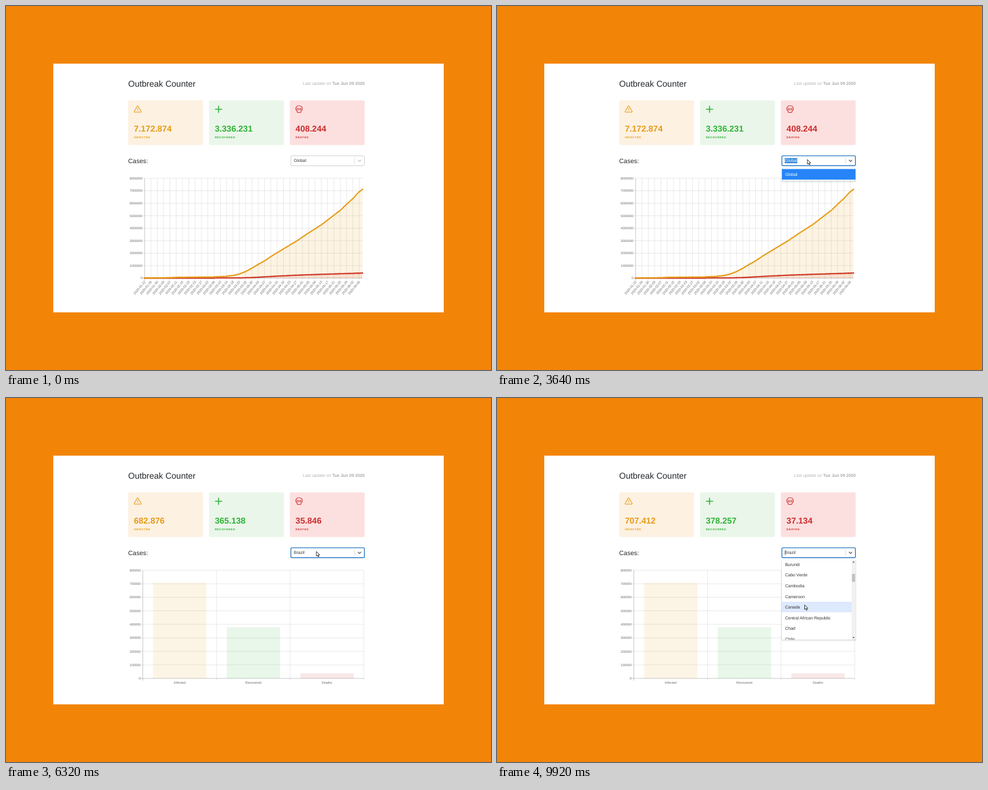
Write an HTML page that moves like this. It is 800x600 px and loops after 10 s.

```html
<!DOCTYPE html>
<html lang="en">
<head>
<meta charset="utf-8">
<title>Outbreak Counter</title>
<style>
  html, body { margin: 0; width: 100%; height: 100%; overflow: hidden; background: #f28507; }
  svg { display: block; }
  text { font-family: "Liberation Sans", Arial, sans-serif; text-rendering: geometricPrecision; }
  .bold { font-weight: bold; }
</style>
</head>
<body>
<svg id="stage" width="800" height="600" viewBox="0 0 800 600"></svg>
<script>
const LOOP = 10000;
const ORANGE = '#e59b16', GREEN = '#2eb135', RED = '#cb2d2d';
const GLOBAL = [7172874, 3336231, 408244], BRAZIL = [707412, 378257, 37134];
const COUNT_START = 4998, CHART_START = 5030;
const ROW = 17.55, LIST_TOP = 268.7, COUNTRY_TOTAL = 188;
const COUNTRIES = ('Global,Afghanistan,Albania,Algeria,Andorra,Angola,Antigua and Barbuda,Argentina,Armenia,' +
  'Australia,Austria,Azerbaijan,Bahamas,Bahrain,Bangladesh,Barbados,Belarus,Belgium,Belize,Benin,Bhutan,' +
  'Bolivia,Bosnia and Herzegovina,Botswana,Brazil,Brunei,Bulgaria,Burkina Faso,Burma,Burundi,Cabo Verde,' +
  'Cambodia,Cameroon,Canada,Central African Republic,Chad,Chile,China,Colombia').split(',');

const smooth = p => p * p * (3 - 2 * p);
const linear = p => p;

// Keys are [position, value, value...]; returns the values at a position.
function track(keys, at, ease = linear) {
  let i = 1;
  while (i < keys.length - 1 && keys[i][0] < at) i++;
  const [a, b] = [keys[i - 1], keys[i]];
  const p = ease(Math.min(1, Math.max(0, (at - a[0]) / (b[0] - a[0]))));
  return a.slice(1).map((v, k) => v + (b[k + 1] - v) * p);
}

const text = (x, y, size, fill, str, extra = '') =>
  `<text x="${x}" y="${y}" font-size="${size}" fill="${fill}" ${extra}>${str}</text>`;
const rect = (x, y, w, h, fill, extra = '') =>
  `<rect x="${x}" y="${y}" width="${w}" height="${h}" fill="${fill}" ${extra}/>`;
const path = (d, stroke, width, extra = '') =>
  `<path d="${d}" fill="none" stroke="${stroke}" stroke-width="${width}" ${extra}/>`;
const range = n => [...Array(n).keys()];
const thousands = n => String(Math.round(n)).replace(/\B(?=(\d{3})+$)/g, '.');

const ROUND = 'stroke-linejoin="round" stroke-linecap="round"';
const CARDS = [
  { x: 201.5, bg: '#fdf1e1', color: ORANGE, label: 'INFECTED',
    icon: path('M216.2 165.4L211.6 173.6Q211 175 212.4 175H222Q223.4 175 222.8 173.6L218.2 165.4Q217.2 164 216.2 165.4ZM217.2 168.4V171M217.2 172.7V173', ORANGE, 1.1, ROUND) },
  { x: 335, bg: '#eaf6ea', color: GREEN, label: 'RECOVERED',
    icon: path('M350.6 165V175.4M345.4 170.2H355.8', GREEN, 1.6, ROUND) },
  { x: 468.2, bg: '#fce0df', color: RED, label: 'DEATHS',
    icon: path('M480.2 173.2Q478 172 478 169.4A5.4 5.2 0 0 1 488.8 169.4Q488.8 172 486.6 173.2V174.2Q486.6 175.5 485.2 175.5H481.6Q480.2 175.5 480.2 174.2Z', RED, 1.1) +
      [481.3, 485.5].map(x => `<circle cx="${x}" cy="169.9" r="1.4" fill="none" stroke="${RED}"/>`).join('') +
      path('M483.4 172.3V173', RED, .8) }
];

function header() {
  return rect(78, 95, 644, 410, '#fff') +
    text(201.5, 132.6, 14, '#25282c', 'Outbreak Counter') +
    text(591.6, 130, 7, '#b4b4b4', 'Last update on <tspan class="bold" fill="#a9a9a9">Tue Jun 09 2020</tspan>', 'text-anchor="end"') +
    CARDS.map(c => rect(c.x, 155.6, 123.4, 73.6, c.bg, 'rx="2.5"') + c.icon +
      text(c.x + 9.4, 206.8, 14, c.color, '', 'class="bold count"') +
      text(c.x + 9.4, 217.7, 4.5, c.color, c.label, 'class="bold" letter-spacing=".6"')).join('') +
    text(201.5, 258.6, 10.5, '#25282c', 'Cases:');
}

// Horizontal grid with value labels, from the top down to zero.
function yAxis(left, right, bottom, unit) {
  const step = (bottom - 284) / 8;
  return range(9).map(i => {
    const y = bottom - i * step;
    return path(`M${left - 3.5} ${y}H${right}`, '#000', .7, `opacity="${i ? .13 : .32}"`) +
      text(left - 3.8, y + 1.9, 5.4, '#666', i * unit, 'text-anchor="end"');
  }).join('');
}

function series(keys, color, fillOpacity) {
  const points = range(139).map(day => {
    const x = 228.7 + day * 2.602;
    return [x.toFixed(1), track(keys, x)[0].toFixed(1)];
  });
  const line = 'M' + points.map(p => p.join(' ')).join('L');
  return `<path d="${line}V448.5H228.7Z" fill="${color}" opacity="${fillOpacity}"/>` +
    path(line, color, 1.5) +
    points.map(([x, y]) => `<circle cx="${x}" cy="${y}" r="1.3" fill="${color}"/>`).join('');
}

function lineChart() {
  const dates = range(35).map(i => {
    const x = 228.7 + i * 10.408;
    const date = new Date(Date.UTC(2020, 0, 22 + i * 4)).toISOString().slice(0, 10);
    return path(`M${x} 284V452.5`, '#000', .7, `opacity="${i ? .13 : .32}"`) +
      text(0, 1.9, 5.4, '#666', date, `text-anchor="end" transform="translate(${x + .4} 453.8) rotate(-50)"`);
  }).join('');
  const deaths = [[228, 448.5], [385, 448.3], [410, 447.4], [440, 445.7], [480, 443.7], [530, 442], [588, 440.2]];
  const infected = [[228, 448.5], [255, 448.2], [285, 447.3], [340, 446.7], [360, 445.8], [375, 444.2], [385, 441.8],
    [395, 437.8], [405, 432.6], [415, 426.5], [425, 421], [440, 411], [460, 399], [480, 387], [500, 373.5],
    [522, 359.5], [540, 345.5], [552, 336.5], [562, 326.5], [573, 316.6], [581, 307.6], [588, 302]];
  return yAxis(228.7, 588, 448.5, 1000000) + dates + series(deaths, RED, .1) + series(infected, ORANGE, .12);
}

function barChart() {
  const columns = range(4).map(i =>
    path(`M${225.7 + i * 121.5} 284V466`, '#000', .7, `opacity="${i ? .13 : .32}"`)).join('');
  return yAxis(225.7, 590.2, 462.2, 100000) + columns +
    ['Infected', 'Recovered', 'Deaths'].map((name, i) =>
      rect(242.6 + i * 121.5, 462, 88, 0, CARDS[i].color, 'class="bar" opacity=".11"') +
      text(286.4 + i * 121.5, 471.4, 5.4, '#666', name, 'text-anchor="middle"')).join('');
}

function menu(options, selected, hot, scroll) {
  const long = options.length > 7;
  const height = long ? 131.5 : options.length * ROW + 4;
  const width = long ? 115 : 121.6;
  const rows = options.map((name, i) => {
    const y = 2 + i * ROW - scroll;
    if (y < -ROW || y > height) return '';
    const fill = name === selected ? '#2684f8' : i === hot ? '#dde9fd' : '#fff';
    return rect(0, y, width, ROW, fill) +
      text(5.2, y + 11.3, 7, name === selected ? '#fff' : '#333', name);
  }).join('');
  const thumb = 6.6 + scroll / (COUNTRY_TOTAL * ROW - 131) * 103;
  const bar = long ? rect(115, 0, 6.6, height, '#f1f1f1') + rect(115.6, thumb, 5, 13, '#c1c1c1') +
    '<path d="M116.4 4.6h3.6l-1.8-2zM116.4 127.2h3.6l-1.8 2z" fill="#444"/>' : '';
  return rect(469.5, 266.5, 122.6, height + 1.5, '#000', 'rx="2" opacity=".09"') +
    rect(468.8, 267.5, 124, height + 2, '#000', 'rx="3" opacity=".05"') +
    `<svg x="470" y="266.7" width="121.6" height="${height}">${rect(0, 0, 121.6, height, '#fff', 'rx="2"')}${rows}${bar}</svg>`;
}

function select(t, cursorY) {
  const focused = t >= 2600;
  const typing = t >= 3720 && t < 4400;
  const marked = t >= 3400 && t < 3720;
  const listOpen = t >= 6960;
  let value = t < 3720 ? 'Global' : 'Brazil';
  if (typing) value = value.slice(0, 1 + Math.floor((t - 3720) / 90));

  const border = focused ? '#2f7dc4' : t > 900 ? '#b0b0b0' : '#cfcfcf';
  let out = rect(469.9, 246.9, 121.4, 16.4, '#fff', `rx="2" stroke="${border}" stroke-width="${focused ? 1.4 : 1}"`) +
    (marked ? rect(474.6, 250.6, 20.8, 8.6, '#3389dd') : '') +
    text(474.8, 257.4, 7, marked ? '#fff' : '#333', value) +
    path('M575 250.3V260', '#ccc', .7) +
    path('M580.8 254L583.1 256.3L585.4 254', focused ? '#555' : '#c4c4c4', 1.1, ROUND);
  if (listOpen) {
    out += path('M475.2 250.6V259.2', '#333', .6);
    const scrollAt = time => track([[7200, 0], [7600, 87.75], [8300, 300], [9000, 512]], time)[0];
    // The highlight trails the wheel a little.
    const hot = Math.floor((cursorY - LIST_TOP + scrollAt(t - 170)) / ROW);
    out += menu(COUNTRIES, 'Brazil', hot, scrollAt(t));
  } else if (focused && t < 4400) {
    const query = value.toLowerCase();
    out += menu(COUNTRIES.filter(c => c.toLowerCase().includes(query)), 'Global', 0, 0);
  }
  return out;
}

const stage = document.getElementById('stage');
stage.innerHTML = header() + `<g id="lines">${lineChart()}</g><g id="bars">${barChart()}</g><g id="select"></g>` +
  '<path id="cursor" d="M0 0V7.6L1.8 6.1L3 8.8L4.3 8.2L3.1 5.6H5.4Z" fill="#fff" stroke="#222" stroke-width=".9"/>';
const [lines, bars, picker, cursor] = ['lines', 'bars', 'select', 'cursor'].map(id => document.getElementById(id));
const counts = stage.querySelectorAll('.count'), columns = stage.querySelectorAll('.bar');
const CURSOR = [[300, 555, 430], [950, 508, 261], [1800, 506, 258], [2300, 512, 253], [6900, 512, 253],
  [7300, 529, 335.5], [8600, 529, 335.5], [9400, 508, 331], [9760, 508, 331], [9860, 507.5, 341]];

function counted(i, t) {
  if (t < COUNT_START) return GLOBAL[i];
  const p = (t - COUNT_START) / 2750;
  return p > .94 ? BRAZIL[i] : BRAZIL[i] * (1 - 2 ** (-10 * p)) * 1024 / 1023;
}

function render(t) {
  const [x, y] = track(CURSOR, t, smooth);
  cursor.setAttribute('transform', `translate(${x} ${y})`);
  cursor.style.display = t < 300 ? 'none' : '';

  counts.forEach((el, i) => el.textContent = thousands(counted(i, t)));

  const showBars = t >= CHART_START;
  lines.style.display = showBars ? 'none' : '';
  bars.style.display = showBars ? '' : 'none';
  const grow = 1 - (1 - Math.min(1, Math.max(0, (t - CHART_START) / 1000))) ** 4;
  columns.forEach((el, i) => {
    const h = BRAZIL[i] / 800000 * 178.2 * grow;
    el.setAttribute('y', 462.2 - h);
    el.setAttribute('height', h);
  });

  const html = select(t, y);
  if (html !== render.last) picker.innerHTML = render.last = html;
}

const start = performance.now();
function frame() {
  render((performance.now() - start) % LOOP);
  requestAnimationFrame(frame);
}
frame();
</script>
</body>
</html>
```
